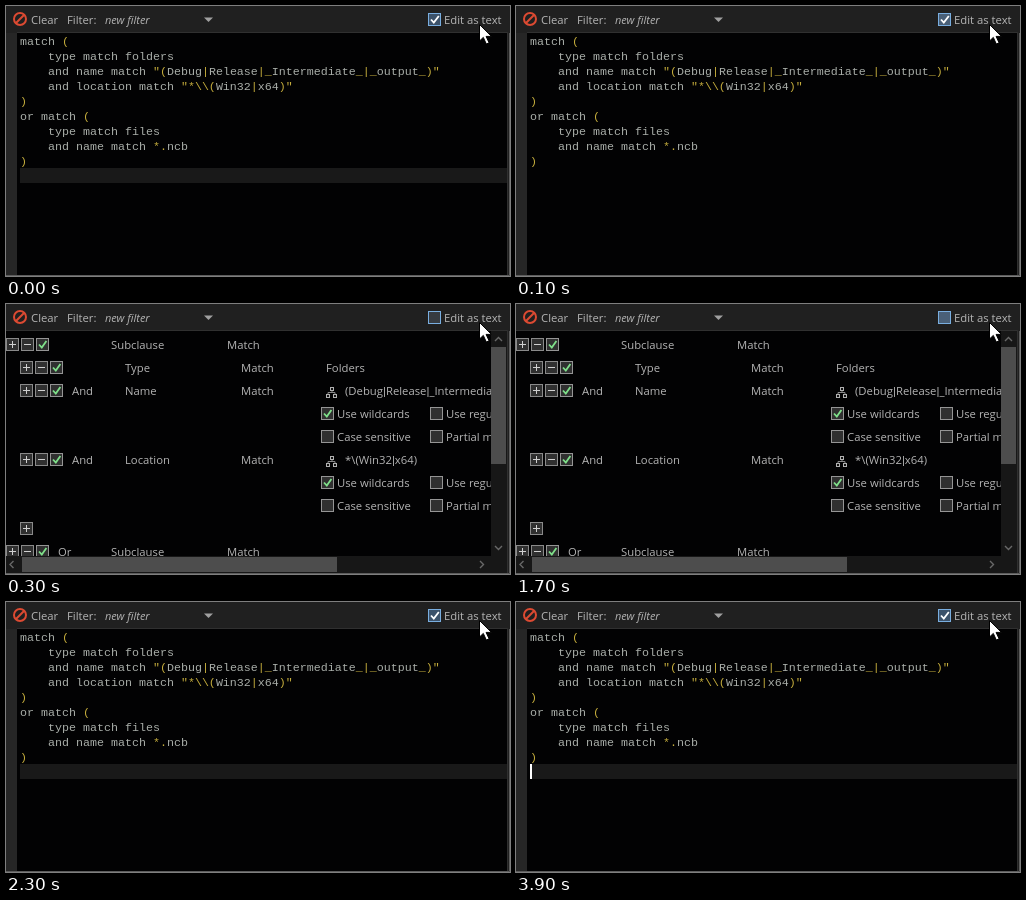
Recreate the animation shown at these times as an HTML page. Size 504 px wide and 270 px high, loop 4200 ms.

```html
<!DOCTYPE html>
<html lang="en">
<head>
<meta charset="utf-8">
<title>Filter editor</title>
<style>
  html, body { margin: 0; width: 100%; height: 100%; overflow: hidden; background: #202020; }
  svg { display: block; }
  text { font: 11.3px "Open Sans", "Noto Sans", sans-serif; fill: #b4b4b4; white-space: pre; }
  .bar { font-family: "Liberation Sans", sans-serif; }
  .code text { font: 11.667px "Liberation Mono", monospace; fill: #a9aea9; }
  .code tspan { fill: #c4ac3c; }
  .italic { font-size: 11px; font-style: italic; }
</style>
</head>
<body>
<svg id="stage" width="504" height="270" viewBox="0 0 504 270"></svg>
<script>
const LOOP = 4200;
const rect = (x, y, w, h, fill, extra = '') =>
  `<rect x="${x}" y="${y}" width="${w}" height="${h}" fill="${fill}" ${extra}/>`;
const path = (d, stroke, width = 1, fill = 'none') =>
  `<path d="${d}" stroke="${stroke}" stroke-width="${width}" fill="${fill}"/>`;
const label = (x, y, text, cls = '') => `<text x="${x}" y="${y}" class="${cls}">${text}</text>`;
const frame = (x, y, size, fill, stroke) =>
  rect(x + .5, y + .5, size - 1, size - 1, fill, `stroke="${stroke}"`);

// Small square controls, placed by their centre
const button = (x, y, plus) => frame(x - 6, y - 7, 13, '#303030', '#8a8a8a') +
  path(`M${x - 3} ${y - .5}h7` + (plus ? `M${x + .5} ${y - 4}v7` : ''), '#d0d0d0');
const check = (x, y, on) => frame(x - 6, y - 7, 13, '#303030', '#959595') +
  (on ? path(`M${x - 3} ${y - .5}l2.8 3 4.6-6.5`, '#7fe08a', 1.8) : '');
const controls = (x, y) => button(x, y, true) + button(x + 15, y, false) + check(x + 30, y, true);
const arrow = (x, y, angle) =>
  `<path d="M-3.5 2L0-1.5 3.5 2" transform="translate(${x} ${y}) rotate(${angle})" fill="none" stroke="#686868" stroke-width="1.4"/>`;

function codeView() {
  const lines = [
    'match (',
    '    type match folders',
    '    and name match "(Debug|Release|_Intermediate_|_output_)"',
    '    and location match "*\\\\(Win32|x64)"',
    ')',
    'or match (',
    '    type match files',
    '    and name match *.ncb',
    ')'
  ];
  const colour = line => line.replace(/[()"|*\\_.]+/g, '<tspan>$&</tspan>');
  return rect(0, 27, 11, 242, '#262626') + rect(11, 27, 490, 242, '#020203') +
    path('M11 26.5H501.5V269', '#303030') +
    '<g id="line">' + rect(14, 162, 487, 15, '#191919') + '</g>' +
    '<g class="code">' + lines.map((s, i) => label(14, 39 + i * 15, colour(s))).join('') + '</g>' +
    '<g id="caret">' + rect(14, 162, 2, 15, '#fff') + '</g>';
}

function clause(indent, y, join, name, value = '') {
  const valueText = value.replaceAll('|', '<tspan class="bar">|</tspan>');
  return controls(6 + indent, y) + label(52 + indent, y + 4, join) +
    label(105 + indent, y + 4, name) + label(221 + indent, y + 4, 'Match') +
    label(value === 'Folders' ? 320 : 339, y + 4, valueText);
}

function pattern(y) {
  const option = (x, dy, text, on) => check(x, y + dy, on) + label(x + 10, y + dy + 4, text);
  const node = (x, ny) => frame(x, ny, 4, '#111', '#b0b0b0');
  return node(324, y - 4) + node(320, y + 3) + node(327, y + 3) +
    path(`M326 ${y}v1.5M322 ${y + 3}v-1.5h7v1.5`, '#888') +
    option(321, 23, 'Use wildcards', true) + option(430, 23, 'Use regular expression', false) +
    option(321, 46, 'Case sensitive', false) + option(430, 46, 'Partial match', false);
}

function treeView() {
  return rect(0, 27, 501, 242, '#020203') +
    '<g clip-path="url(#treeArea)">' +
    clause(0, 41, '', 'Subclause') +
    clause(14, 64, '', 'Type', 'Folders') +
    clause(14, 87, 'And', 'Name', '(Debug|Release|_Intermediate_|_output_)') + pattern(87) +
    clause(14, 156, 'And', 'Location', '*\\(Win32|x64)') + pattern(156) +
    button(20, 225, true) +
    clause(0, 248, 'Or', 'Subclause') + '</g>' +
    rect(485, 27, 16, 242, '#171717') + rect(0, 252, 485, 17, '#171717') +
    rect(485, 43, 15, 117, '#4d4d4d') + rect(16, 253, 315, 15, '#4d4d4d') +
    arrow(492.5, 35, 0) + arrow(492.5, 244, 180) + arrow(5.5, 260.5, -90) + arrow(476, 260.5, 90) +
    path('M0 26.5H501.5V269', '#303030');
}

function toolbar() {
  return '<circle cx="14" cy="13" r="6" fill="none" stroke="#dc4a32" stroke-width="2"/>' +
    path('M10 17L18 9', '#dc4a32', 2) +
    label(25, 18, 'Clear') + label(61, 18, 'Filter:') + label(99, 18, 'new filter', 'italic') +
    path('M198 11.5h9l-4.5 4.5z', 'none', 0, '#a0a0a0') +
    '<g id="box">' + frame(422, 7, 13, '#363b41', '#79aee0') + '</g>' +
    '<g id="tick">' + path('M425 13.5l2.8 3 5-6.5', '#fff', 1.8) + '</g>' +
    label(438, 18, 'Edit as text');
}

const stage = document.getElementById('stage');
stage.innerHTML =
  '<clipPath id="treeArea">' + rect(0, 27, 485, 225, '#000') + '</clipPath>' +
  rect(0, 0, 504, 270, '#202020') +
  '<g id="code">' + codeView() + '</g><g id="tree">' + treeView() + '</g>' + toolbar() +
  path('M0 269.5H503.5V27', '#5c5c5c') +
  path('M473.5 18.5v16.5l3.8-3.6 3 6.6 2.8-1.2-3-6.4h5.4z', '#000', 1, '#fff');

const part = id => document.getElementById(id);
const show = (id, on) => part(id).setAttribute('display', on ? 'inline' : 'none');
const within = (t, from, to) => t >= from && t < to;

function draw(now) {
  const t = now % LOOP;
  const tree = within(t, 160, 1760);
  const checked = !within(t, 230, 1860);
  const pressed = within(t, 30, 300) || within(t, 1700, 1900);
  show('tree', tree);
  show('code', !tree);
  show('line', !within(t, 30, 1760));
  show('caret', within(t, 1760, 2300) || within(t, 2800, 3400) || t >= 3900);
  show('tick', checked);
  part('box').firstChild.setAttribute('fill', pressed ? '#4a6078' : checked ? '#3c526a' : '#363b41');
  requestAnimationFrame(draw);
}
draw(0);
</script>
</body>
</html>
```
